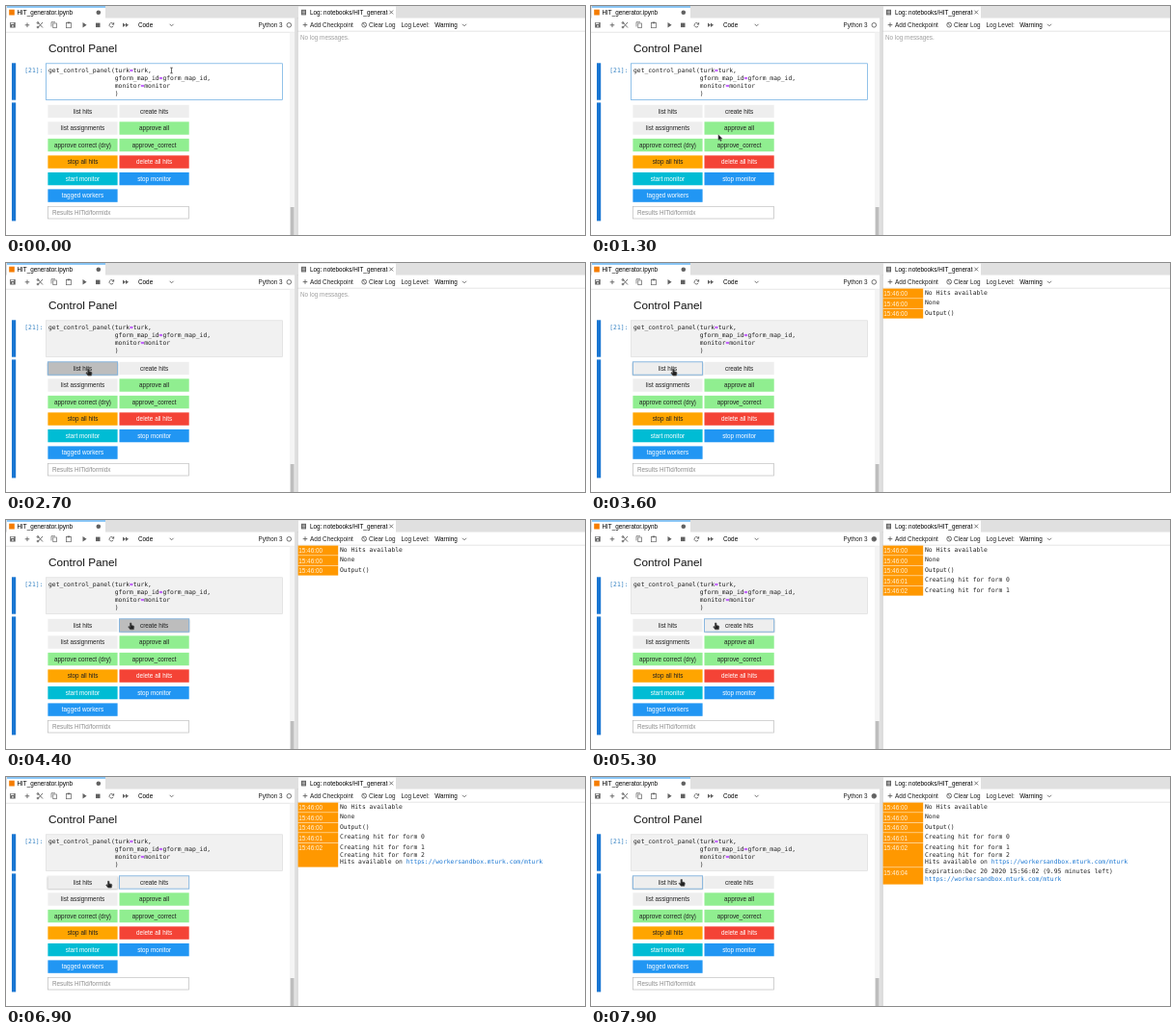
Write an HTML page with a canvas that moves like this. It is 600x238 px and loops after 8 s.

```html
<!DOCTYPE html>
<html lang="en">
<head>
<meta charset="utf-8">
<title>Control Panel</title>
<style>
  html, body { margin: 0; width: 100%; height: 100%; overflow: hidden; background: #fff; }
  canvas { display: block; }
</style>
</head>
<body>
<canvas id="stage" width="600" height="238"></canvas>
<script>
const ctx = document.getElementById('stage').getContext('2d');
const LOOP = 8000, STEP = 100;
const SIZE = 6.35;
const SANS = '"Liberation Sans", Arial, sans-serif';
const MONO = '"DejaVu Sans Mono", monospace';
const INK = '#212121', ICON = '#616161', BLUE = '#2196f3', ORANGE = '#ff9800';

// Button label, fill, text colour; two per row.
const BUTTONS = [
  ['list hits', '#eeeeee', INK], ['create hits', '#eeeeee', INK],
  ['list assignments', '#eeeeee', INK], ['approve all', '#90ee90', INK],
  ['approve correct (dry)', '#90ee90', INK], ['approve_correct', '#90ee90', INK],
  ['stop all hits', '#ffa500', INK], ['delete all hits', '#f44336', '#fff'],
  ['start monitor', '#00bcd4', '#fff'], ['stop monitor', BLUE, '#fff'],
  ['tagged workers', BLUE, '#fff'],
].map(([label, fill, color], i) => ({
  label, fill, color,
  x: 43.4 + (i % 2) * 74.1, y: 102.8 + Math.floor(i / 2) * 17.52, w: 72.2, h: 13.4,
}));

// Pointer tip: time, x, y.
const PATH = [
  [0, 171.5, 67], [200, 171.5, 67], [400, 169, 86], [600, 169, 86],
  [800, 160, 113], [1000, 160, 113], [1300, 132, 133.8], [1800, 99, 146],
  [1900, 98, 144], [2400, 85.5, 110.2], [3700, 85.5, 110.2], [4200, 129.3, 107],
  [6400, 129.3, 107], [6900, 106.3, 108.3], [7300, 93.8, 106.5], [8000, 93.8, 106.5],
];

// Button index, press time, release time, time the kernel turns idle.
const CLICKS = [[0, 2600, 2800, 3400], [1, 4300, 4500, 5800], [0, 7300, 7500, LOOP]];

const URL_TEXT = 'https://workersandbox.mturk.com/mturk';
const LOG = [
  ['15:46:00', [[3300, 'No Hits available']]],
  ['15:46:00', [[3300, 'None']]],
  ['15:46:00', [[3400, 'Output()']]],
  ['15:46:01', [[4800, 'Creating hit for form 0']]],
  ['15:46:02', [[5200, 'Creating hit for form 1'], [5700, 'Creating hit for form 2'],
                [5800, 'Hits available on ', URL_TEXT]]],
  ['15:46:04', [[7800, 'Expiration:Dec 20 2020 15:56:02 (9.95 minutes left)'],
                [7800, '', URL_TEXT]]],
];

function rect(x, y, w, h, fill) {
  ctx.fillStyle = fill;
  ctx.fillRect(x, y, w, h);
}

function frame(x, y, w, h, color, width = 0.7) {
  ctx.strokeStyle = color;
  ctx.lineWidth = width;
  ctx.strokeRect(x, y, w, h);
}

function text(str, x, y, color = INK, font = SANS, size = SIZE, weight = '') {
  ctx.font = `${weight} ${size}px ${font}`;
  ctx.fillStyle = color;
  ctx.fillText(str, x, y);
  return x + ctx.measureText(str).width;
}

function line(points, color = ICON, width = 0.9) {
  ctx.beginPath();
  points.forEach(([x, y]) => ctx.lineTo(x, y));
  ctx.strokeStyle = color;
  ctx.lineWidth = width;
  ctx.stroke();
}

function shape(points, fill, edge) {
  ctx.beginPath();
  points.forEach(([x, y]) => ctx.lineTo(x, y));
  ctx.closePath();
  ctx.fillStyle = fill;
  ctx.fill();
  if (!edge) return;
  ctx.strokeStyle = edge;
  ctx.lineWidth = 0.7;
  ctx.stroke();
}

function circle(x, y, r, fill, edge, from = 0, to = 2 * Math.PI) {
  ctx.beginPath();
  ctx.arc(x, y, r, from, to);
  if (fill) { ctx.fillStyle = fill; ctx.fill(); }
  if (edge) { ctx.strokeStyle = edge; ctx.lineWidth = 0.9; ctx.stroke(); }
}

function plus(x, y) {
  line([[x - 2.3, y], [x + 2.3, y]]);
  line([[x, y - 2.3], [x, y + 2.3]]);
}

function chevron(x, y) {
  line([[x - 2, y - 1], [x, y + 1], [x + 2, y - 1]]);
}

function drawTabs() {
  rect(0, 0, 299, 12.5, '#e0e0e0');
  rect(302, 0, 298, 12.5, '#e0e0e0');
  rect(1, 0.5, 102, 13, '#fff');
  rect(1, 0.5, 102, 1, BLUE);
  rect(303, 0.5, 101, 13, '#fff');
  rect(3.2, 3.7, 5.6, 5.8, '#f57c00');
  text('HIT_generator.ipynb', 11.5, 9, '#000');
  circle(95.8, 6.7, 2.3, ICON);

  rect(306, 3.8, 5, 5.6, ICON);
  [5.2, 6.6, 8].forEach(y => line([[307, y], [310, y]], '#fff', 0.5));
  ctx.save();
  ctx.beginPath();
  ctx.rect(303, 0, 92.7, 13);
  ctx.clip();
  text('Log: notebooks/HIT_generator', 315, 9, '#000');
  ctx.restore();
  line([[397.3, 4.6], [401.1, 8.4]]);
  line([[401.1, 4.6], [397.3, 8.4]]);
}

function drawToolbar(busy) {
  rect(4.2, 17, 5.5, 5.5, ICON);
  rect(5, 17.6, 3.3, 1.3, '#fff');
  circle(7, 20.8, 0.9, '#fff');
  plus(22, 19.8);
  line([[33, 17], [38, 22.5]]);
  line([[33, 22.5], [38, 17]]);
  circle(33, 17.5, 0.9, null, ICON);
  circle(33, 22, 0.9, null, ICON);
  frame(48.8, 18, 3.8, 4.7, ICON);
  line([[47, 21.5], [47, 16.7], [51, 16.7]], ICON, 0.7);
  frame(62.6, 17.3, 4.8, 5.4, ICON);
  rect(63.6, 16.6, 2.8, 1.6, ICON);
  shape([[79.5, 17], [83.6, 19.8], [79.5, 22.6]], ICON);
  rect(93, 17.6, 4.5, 4.5, ICON);
  circle(109.3, 19.8, 2.2, null, ICON, 0.5, 5.5);
  shape([[112.1, 16.8], [112.1, 19.4], [109.5, 19.4]], ICON);
  shape([[121, 17.5], [124, 19.8], [121, 22.1]], ICON);
  shape([[124, 17.5], [127, 19.8], [124, 22.1]], ICON);
  text('Code', 137, 22, '#000');
  chevron(171.6, 19.8);
  text('Python 3', 261.5, 22);
  circle(293.3, 19.8, 2.3, busy ? ICON : '#fff', ICON);
  line([[0, 27.3], [299, 27.3]], '#dcdcdc', 0.7);

  plus(310, 19.6);
  text('Add Checkpoint', 315, 22);
  circle(371.2, 19.6, 2.4, null, ICON);
  line([[369.6, 18], [372.8, 21.2]]);
  text('Clear Log', 376, 22);
  text('Log Level:', 409.5, 22);
  text('Warning', 444.3, 22, '#000');
  chevron(475, 19.8);
  line([[302, 26.2], [600, 26.2]], '#dcdcdc', 0.7);
}

function drawCell(editing) {
  text('Control Panel', 44, 47.7, '#111', SANS, 11.75);
  rect(6, 59.3, 4.2, 38.4, '#1976d2');
  rect(6, 100.4, 4.2, 123, '#1976d2');
  text('[21]:', 19.3, 68.7, '#307fc1', MONO);
  rect(41.6, 59.8, 245, 37.7, editing ? '#fff' : '#f1f1f1');
  frame(41.6, 59.8, 245, 37.7, editing ? '#64a8e0' : '#dddddd');

  const indent = ' '.repeat(18);
  ['get_control_panel(turk=turk,', indent + 'gform_map_id=gform_map_id,',
    indent + 'monitor=monitor', indent + ')'].forEach((code, i) => {
    let x = 44;
    code.split(/(=)/).forEach(part => {
      const op = part === '=';
      x = text(part, x, 68.7 + i * 8.15, op ? '#aa22ff' : INK, MONO, SIZE, op ? 'bold' : '');
    });
  });
}

const inside = (b, x, y) => x >= b.x && x <= b.x + b.w && y >= b.y && y <= b.y + b.h;

function drawButtons(pressed, focused, hovered) {
  ctx.textAlign = 'center';
  BUTTONS.forEach((b, i) => {
    ctx.save();
    if (i === hovered) {
      ctx.shadowColor = 'rgba(0,0,0,.3)';
      ctx.shadowBlur = 1.8;
      ctx.shadowOffsetY = 0.8;
    }
    rect(b.x, b.y, b.w, b.h, i === pressed ? '#bdbdbd' : b.fill);
    ctx.restore();
    if (i === focused) frame(b.x, b.y, b.w, b.h, '#7fb2de', 0.9);
    text(b.label, b.x + b.w / 2, b.y + 8.9, b.color);
  });
  ctx.textAlign = 'left';
  frame(43.5, 208.3, 146, 12.7, '#bdbdbd');
  text('Results HITid/formidx', 48, 216.9, '#8c8c8c');
}

function drawPanes() {
  rect(294, 27.6, 5, 211, '#f4f4f4');
  rect(294.7, 209, 3.8, 29, '#bdbdbd');
  rect(299, 0, 3, 238, '#e0e0e0');
  line([[302.3, 12], [302.3, 238]], '#bdbdbd', 0.6);
}

function drawLog(now) {
  if (now < LOG[0][1][0][0]) {
    text('No log messages.', 305, 35.4, '#9e9e9e');
    return;
  }
  let top = 26.6;
  for (const [stamp, lines] of LOG) {
    const shown = lines.filter(([at]) => now >= at);
    if (!shown.length) break;
    const height = 10.5 + (shown.length - 1) * 7.5;
    rect(302.6, top, 41.6, height - 0.5, ORANGE);
    text(stamp, 303.3, top + 7.7, '#fff3e0');
    shown.forEach(([, message, link = ''], i) => {
      const y = top + 6.3 + i * 7.6;
      const x = text(message, 346, y, INK, MONO);
      text(link, x, y, '#1976d2', MONO);
    });
    top += height;
  }
}

function pointerAt(now) {
  const i = PATH.findIndex(([t]) => t > now);
  const [t0, x0, y0] = PATH[i - 1], [t1, x1, y1] = PATH[i];
  const u = (now - t0) / (t1 - t0), ease = u * u * (3 - 2 * u);
  return [x0 + (x1 - x0) * ease, y0 + (y1 - y0) * ease];
}

function drawPointer(x, y, overButton) {
  const at = points => points.map(([dx, dy]) => [x + dx, y + dy]);
  if (overButton) {
    shape(at([[-0.8, 0], [0.6, 0], [0.8, 2.6], [3, 3], [3.5, 4], [3, 6.8],
      [-0.6, 6.8], [-2.6, 4], [-2, 3.4], [-0.8, 4.4]]), '#222', '#555');
  } else if (y < 98) {
    line(at([[0, -2.8], [0, 2.8]]), '#333', 0.7);
    line(at([[-1.3, -2.8], [1.3, -2.8]]), '#333', 0.7);
    line(at([[-1.3, 2.8], [1.3, 2.8]]), '#333', 0.7);
  } else {
    shape(at([[0, 0], [0, 5.6], [1.3, 4.5], [2.3, 6.6], [3.2, 6.1],
      [2.3, 4.1], [4, 4]]), '#111', '#666');
  }
}

function draw(now) {
  const click = CLICKS.filter(([, down]) => now >= down).pop();
  const [focused, , up, idle] = click || [-1, 0, 0, 0];
  const [x, y] = pointerAt(now);
  const hovered = BUTTONS.findIndex(b => inside(b, x, y));

  rect(0, 0, 600, 238, '#fff');
  drawTabs();
  drawToolbar(now >= up && now < idle);
  drawCell(!click);
  drawButtons(now < up ? focused : -1, focused, hovered);
  drawPanes();
  drawLog(now);
  drawPointer(x, y, hovered >= 0);
}

const start = performance.now();
function tick() {
  const elapsed = (performance.now() - start) % LOOP;
  draw(Math.floor(elapsed / STEP) * STEP);
  requestAnimationFrame(tick);
}
tick();
</script>
</body>
</html>
```
